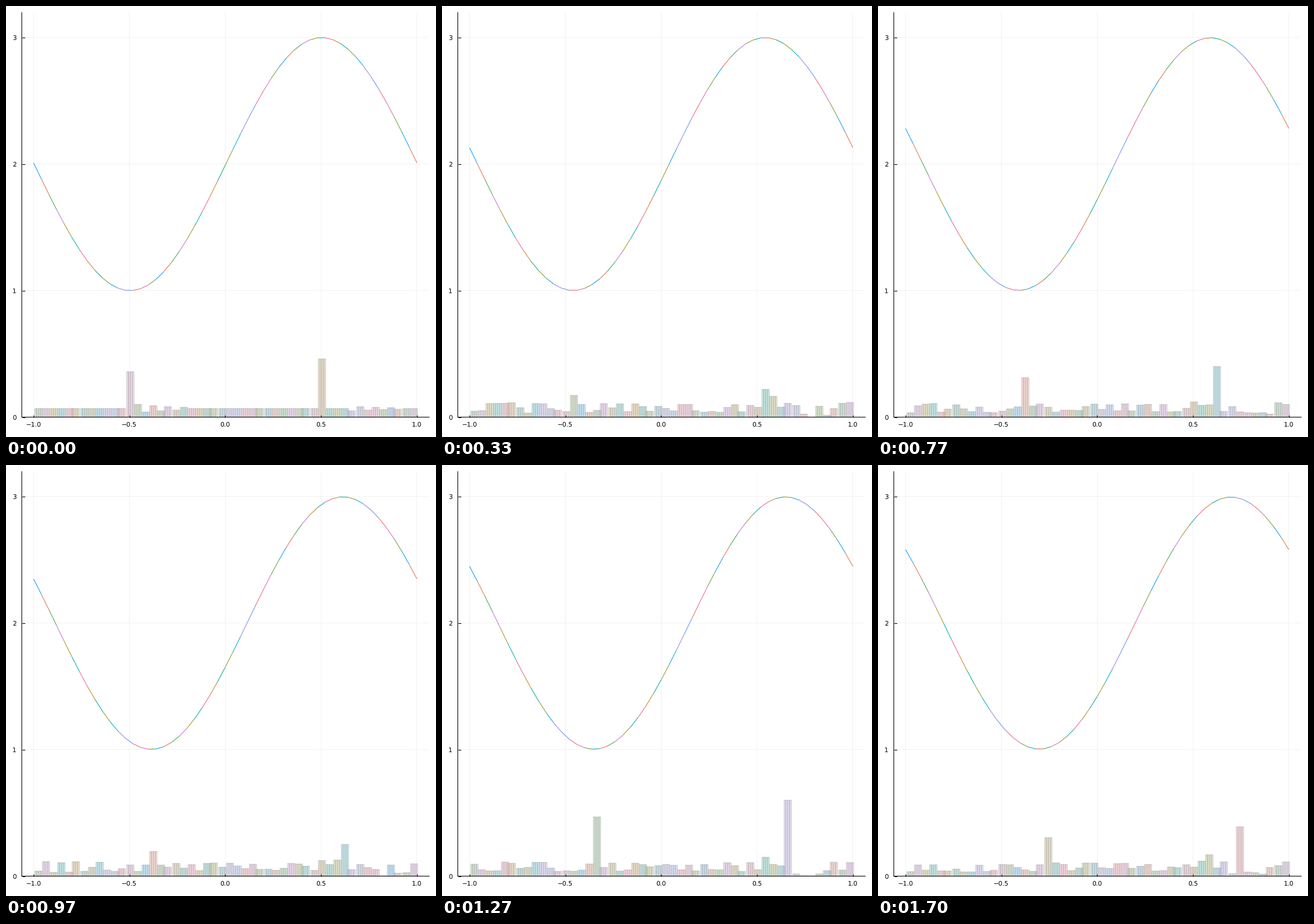
A matplotlib script that plays this animation: 748 px wide and 749 px high, repeating every 1.73 s.

```python
import numpy as np
import matplotlib.pyplot as plt
from matplotlib.animation import FuncAnimation
from matplotlib.collections import LineCollection, PolyCollection
from matplotlib.colors import to_rgba

plt.rcParams.update({"path.snap": False, "text.hinting": "none"})

W, H, DPI = 748, 749, 100
PX = 72 / DPI                      # one pixel in points
LEFT, RIGHT, TOP, BASE = 27.5, 736.3, 11.5, 714.5
X0, SX, SY = 381.3, 333.4, 219.9   # pixel of x = 0, pixels per unit
CELLS, STEP = 50, 0.04
TICKS = 173                        # 10 ms each

PALETTE = ["#009AFA", "#E36F47", "#3EA44E", "#C371D2", "#AC8E18", "#00AAAE",
           "#ED5E93", "#C68225", "#00A98D", "#8E971E", "#00A9CC", "#9B7FE9",
           "#618DF6", "#F06073", "#DD65B6", "#6C9F33"]

# key points of the spike that follows each extremum
PEAK_TIME = [0, 10, 16, 23, 29, 38, 51]
PEAK_SIZE = [.46, .22, .84, .40, .25, .60, .39]

cells = np.arange(CELLS)
edges = -1 + STEP * np.arange(CELLS + 1)
mids = edges[:-1] + STEP / 2
rng = np.random.default_rng(7)
phase = rng.uniform(0, 2 * np.pi, CELLS)
rate = 2 * np.pi / rng.uniform(4, 9, CELLS)


def bump(center, width):
    return np.exp(-((mids - center) / width) ** 2)


# flat at first, with a damped ripple behind each extremum
calm = np.full(CELLS, 0.068)
for first, size in ((13, 0.033), (41, -0.018)):
    n = np.arange(7)
    calm[first:first + 7] += size * (-0.82) ** n

# later uneven: high near the crest, low beyond it, rougher at the sides
level = 0.073 + 0.06 * bump(0.57, 0.06) - 0.035 * bump(0.78, 0.09)
spread = 0.03 + 0.015 * np.abs(mids)

# four narrow bars per cell; every sixth cell sits slightly to the left
nudge = np.where(cells % 6 == 5, -0.0045, 0)
centers = ((edges[:-1] + nudge)[:, None] + 0.01 * np.arange(1, 5)).ravel()
HALF = 0.004


def segments(k):
    shift = 0.0032 + 0.00382 * k
    y = 2 + (1 - 0.00008 * k) * np.sin(np.pi * (edges - shift))
    pts = np.column_stack([edges, y])
    return np.stack([pts[:-1], pts[1:]], axis=1)


def heights(k):
    rough = min(1, k / 8)
    noise = spread * np.cos(rate * k + phase)
    h = calm + rough * (level + noise - calm)
    at = int(12.55 + 0.108 * k)
    peak = np.interp(k, PEAK_TIME, PEAK_SIZE)
    h[at], h[at + 25] = 0.78 * peak, peak
    return np.clip(h, 0, None)


def bars(k):
    h = np.repeat(heights(k), 4)
    lo, hi, zero = centers - HALF, centers + HALF, np.zeros_like(h)
    x = np.column_stack([lo, lo, hi, hi])
    y = np.column_stack([zero, h, h, zero])
    return np.stack([x, y], axis=2)


fig = plt.figure(figsize=(W / DPI, H / DPI), dpi=DPI, facecolor="white")
ax = fig.add_axes([LEFT / W, 1 - BASE / H, (RIGHT - LEFT) / W, (BASE - TOP) / H])
ax.set_xlim((LEFT - X0) / SX, (RIGHT - X0) / SX)
ax.set_ylim(0, (BASE - TOP) / SY)
ax.set_axisbelow(True)
ax.grid(color="black", alpha=0.1, lw=0.55 * PX)
for side in ("top", "right"):
    ax.spines[side].set_visible(False)
for side in ("left", "bottom"):
    ax.spines[side].set_linewidth(1.1 * PX)
ax.tick_params(direction="in", length=4.5 * PX, width=1.1 * PX)
xticks = np.linspace(-1, 1, 5)
ax.set_xticks(xticks, [""] * 5)
ax.set_yticks(range(4), [""] * 4)


def label(x, y, text, ha):
    fig.text(x / W, 1 - y / H, text, ha=ha, va="baseline",
             family="DejaVu Sans", size=11 * PX)


for x in xticks:
    label(X0 + SX * x, 730.4, f"{x:.1f}".replace("-", "\u2212"), "center")
for y in range(4):
    label(17.8, BASE - SY * y + 4, str(y), "right")

line_colors = [PALETTE[i % 16] for i in cells]
bar_colors = [to_rgba(PALETTE[(CELLS + i) % 16], 0.2) for i in np.repeat(cells, 4)]
curve = LineCollection(segments(0), colors=line_colors, linewidths=1.05 * PX,
                       zorder=3)
columns = PolyCollection(bars(0), facecolors=bar_colors,
                         edgecolors=(0, 0, 0, 0.2), linewidths=1.0 * PX,
                         zorder=2, clip_on=False)
for part in (curve, columns):
    ax.add_collection(part, autolim=False)


def update(tick):
    k = int((tick + 0.5) * 0.3)    # 30 pictures per second
    curve.set_segments(segments(k))
    columns.set_verts(bars(k))
    return curve, columns


anim = FuncAnimation(fig, update, frames=TICKS, interval=10, repeat=True,
                     repeat_delay=0, blit=False)
plt.show()
```
